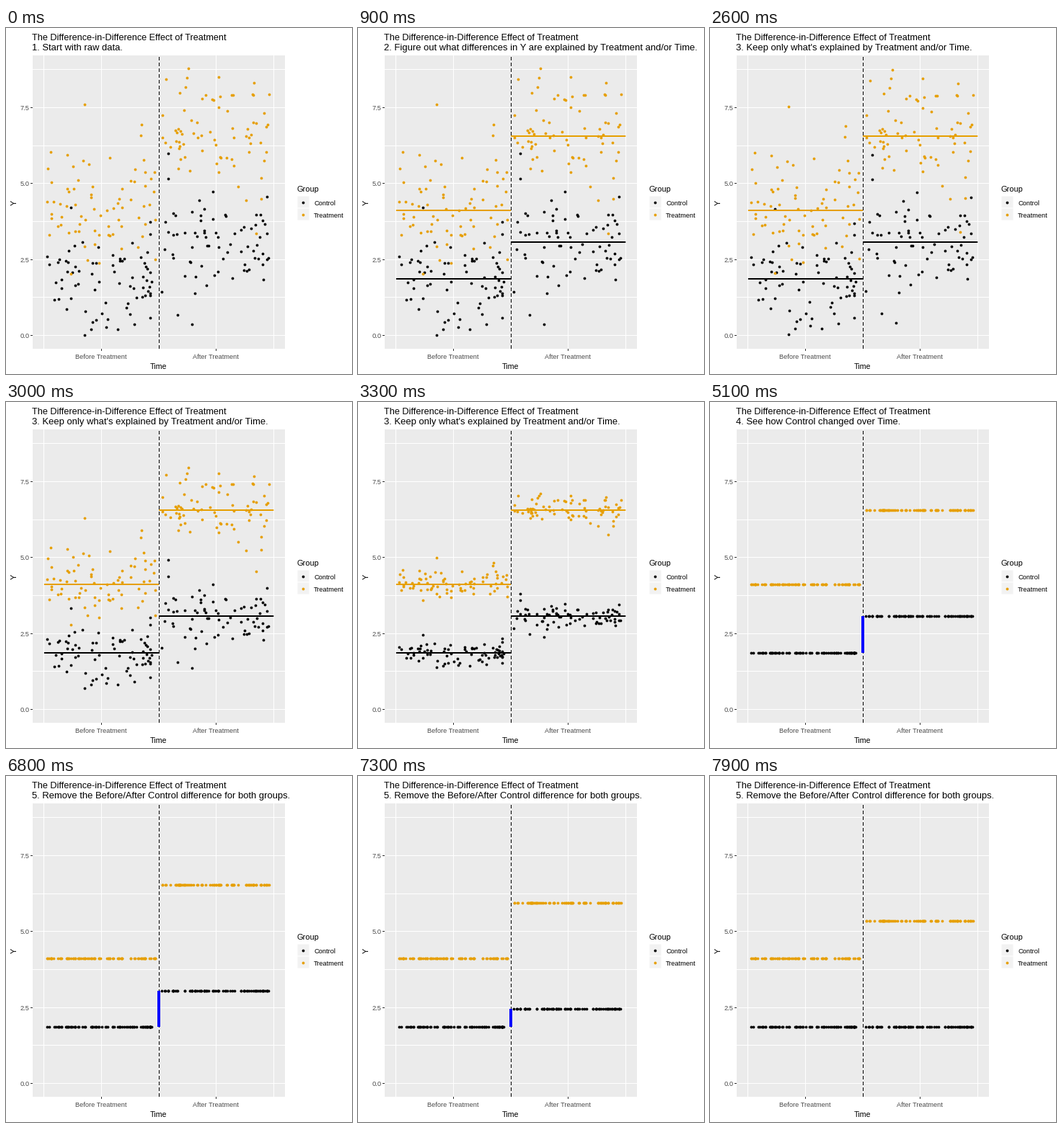
Recreate the animation shown at these times as a matplotlib script. Size 480 by 480 pixels, loop 8 s.

```python
import numpy as np
import matplotlib.pyplot as plt
from matplotlib.animation import FuncAnimation
from matplotlib.patches import Rectangle

plt.rcParams["font.family"] = "Liberation Sans"
plt.rcParams["path.snap"] = False
SIZE, DPI, STEP, LOOP = 480, 72, 100, 8000
BLACK, AMBER, BLUE = "black", "#E69F00", "blue"
LEFT, RIGHT, TOP, BOTTOM = 37, 387, 38, 445
BEFORE, AFTER = 1, 2
PER_GROUP = 75

STEPS = [
    (0, "1. Start with raw data."),
    (500, "2. Figure out what differences in Y are explained by Treatment and/or Time."),
    (2600, "3. Keep only what's explained by Treatment and/or Time."),
    (4700, "4. See how Control changed over Time."),
    (6800, "5. Remove the Before/After Control difference for both groups."),
]

# colour, period, mean, outliers as (time, Y)
GROUPS = [
    (BLACK, BEFORE, 1.86, [(0.85, 0)]),
    (AMBER, BEFORE, 4.12, [(0.85, 7.6), (1.35, 6.95)]),
    (BLACK, AFTER, 3.07, [(1.58, 6.0), (1.79, 0.37)]),
    (AMBER, AFTER, 6.56, [(1.76, 8.79), (2.35, 3.35)]),
]
BASE, RAISED = GROUPS[0][2], GROUPS[2][2]


def px(time):
    return 132.5 + 159.2 * (time - 1)


def py(value):
    return 426.5 - 42.13 * value


def progress(ms, start):
    t = np.clip((ms - start + STEP) / 1200, 0, 1)
    return (1 - np.cos(np.pi * t)) / 2


fig = plt.figure(figsize=(SIZE / DPI, SIZE / DPI), dpi=DPI, facecolor="white")
ax = fig.add_axes([0, 0, 1, 1])
ax.set(xlim=(0, SIZE), ylim=(SIZE, 0))
ax.axis("off")


def line(x, y, color, width, **kw):
    return ax.plot(x, y, color=color, lw=width, solid_capstyle="butt", **kw)[0]


def label(x, y, text, size, color="black", **kw):
    return ax.text(x, y, text, fontsize=size, color=color, va="baseline", **kw)


def dots(x, y, color):
    return ax.plot(np.round(x), np.round(y), "o", color=color, ms=3.8, mew=0,
                   antialiased=False, zorder=3)[0]


# Panel, grid and axes, with thin lines on pixel centres
ax.add_patch(Rectangle((LEFT, TOP), RIGHT - LEFT, BOTTOM - TOP, fc="#EBEBEB", lw=0))
for time in np.arange(0.5, 3, 0.5):
    gx = np.floor(px(time)) + 0.5
    line([gx, gx], [TOP, BOTTOM], "white", 1, zorder=1)
for value in np.arange(0, 9, 1.25):
    gy = np.floor(py(value)) + 0.5
    line([LEFT, RIGHT], [gy, gy], "white", 1, zorder=1)
    if value % 2.5 == 0:
        line([LEFT - 3, LEFT], [gy, gy], "#333333", 1)
        label(32.5, gy + 3.5, f"{value:.1f}", 9.2, "#4D4D4D", ha="right")
for time, name in ((BEFORE, "Before Treatment"), (AFTER, "After Treatment")):
    gx = np.floor(px(time)) + 0.5
    line([gx, gx], [BOTTOM, BOTTOM + 3], "#333333", 1)
    label(gx - 0.5, 459, name, 9.3, "#4D4D4D", ha="center")
label(212, 473, "Time", 10.6, ha="center")
label(15, 242, "Y", 11, ha="center", rotation=90, rotation_mode="anchor")

# Legend
label(404, 227, "Group", 11)
for key_y, name, color in ((233, "Control", BLACK), (250, "Treatment", AMBER)):
    ax.add_patch(Rectangle((404, key_y), 17, 17, fc="#F2F2F2", ec="white", lw=1))
    dots([412], [key_y + 9], color)
    label(427, key_y + 13, name, 9.3)

label(36.5, 17, "The Difference-in-Difference Effect of Treatment", 12.65)
subtitle = label(36.5, 31, "", 12.95)

# Data
rng = np.random.default_rng(12)
mid = np.floor(px(1.5)) + 0.5
clouds, means = [], []
for color, period, mean, outliers in GROUPS:
    count = PER_GROUP - len(outliers)
    out_time, out_y = np.array(outliers).T
    time = np.append(period + rng.uniform(-0.475, 0.475, count), out_time)
    y = np.append(np.clip(rng.normal(mean, 0.9, count), 0.2, 8.5), out_y)
    clouds.append((dots(px(time), py(y), color), y, mean, period))
    means.append(line(px(period + np.array([-0.5, 0.5])), np.round([py(mean)] * 2),
                      color, 2, zorder=4))
line([mid, mid], [BOTTOM, TOP], "black", 1, ls=(0, (5, 3)), zorder=5)
gap = line([mid - 0.5, mid - 0.5], [0, 0], BLUE, 4, zorder=6)


def draw(i):
    ms = i * STEP
    subtitle.set_text([text for start, text in STEPS if ms >= start][-1])
    settle = progress(ms, 2600)
    drop = (RAISED - BASE) * progress(ms, 6800)
    for cloud, y, mean, period in clouds:
        level = mean - drop * (period == AFTER)
        cloud.set_ydata(np.round(py(level + (y - mean) * (1 - settle))))
    for mean_line in means:
        mean_line.set_visible(900 <= ms < 4700)
    gap.set_ydata(np.round([py(RAISED - drop), py(BASE)]))
    gap.set_visible(5100 <= ms < LOOP - STEP)


anim = FuncAnimation(fig, draw, frames=LOOP // STEP, interval=STEP,
                     init_func=lambda: draw(0), repeat=True, repeat_delay=0)
plt.show()
```
